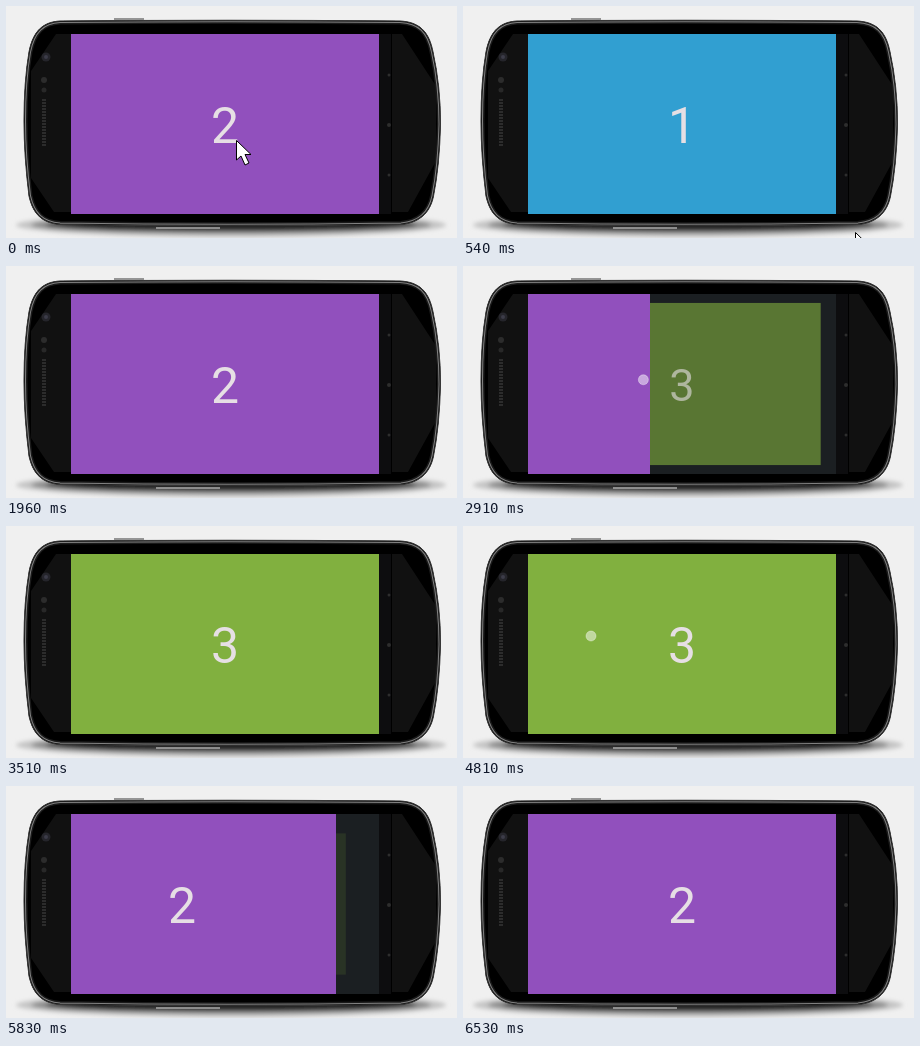
Write an HTML page with a canvas that moves like this. It is 451 by 232 pixels and loops after 7.13 s.

```html
<!DOCTYPE html>
<html lang="en">
<head>
<meta charset="utf-8">
<title>Depth page swipe</title>
<style>
  html, body { margin: 0; width: 100%; height: 100%; overflow: hidden; background: #f0f0f0; }
  svg, canvas { position: absolute; left: 0; top: 0; width: 451px; height: 232px; }
</style>
</head>
<body>
<svg viewBox="0 0 451 232">
  <defs>
    <filter id="soft" x="-10%" y="-50%" width="120%" height="200%"><feGaussianBlur stdDeviation="2"/></filter>
    <path id="body" d="M54 15Q220 13.5 394 15C413 16 423 25 427 46Q434.5 80 434.5 118Q433.5 160 427.5 190C424 208 412 217 395 218.5Q220 221 54 218.5C36 217 27 208 23 190Q18 150 18 115Q18 75 23 46C27 25 37 16 54 15Z"/>
    <clipPath id="inside"><use href="#body"/></clipPath>
  </defs>
  <g filter="url(#soft)">
    <ellipse cx="225" cy="219" rx="215" ry="12" fill="#c4c4c4"/>
    <ellipse cx="225" cy="219" rx="200" ry="9" fill="#888"/>
    <ellipse cx="225" cy="219" rx="185" ry="6" fill="#222"/>
  </g>
  <path d="M108 13h30" stroke="#777" stroke-width="1.5"/>
  <use href="#body" fill="#000" stroke="#2a2a2a"/>
  <g clip-path="url(#inside)">
    <path d="M65 28H50L25 65V172L48 206H65ZM386 28H396L430 80V155L402 206H386Z" fill="#111"/>
    <use href="#body" fill="none" stroke="#1a1a1a" stroke-width="7"/>
    <use href="#body" fill="none" stroke="#808080" stroke-width="4"/>
    <use href="#body" fill="none" stroke="#1c1c1c" stroke-width="2"/>
  </g>
  <path d="M150 222h64" stroke="#aaa" stroke-width="1.5"/>
  <circle cx="40" cy="51" r="4.5" fill="#25252b"/>
  <circle cx="40" cy="51" r="2" fill="#3c3c48"/>
  <circle cx="38" cy="74" r="3" fill="#2c2c2c"/>
  <circle cx="38" cy="84" r="2.5" fill="#282828"/>
  <path d="M38 93v48" stroke="#2c2c2c" stroke-width="4" stroke-dasharray="2 1"/>
  <path d="M373 28h12v180h-12z" fill="#0d0d0f"/>
  <g fill="#2e2e2e"><circle cx="383" cy="69" r="1.5"/><circle cx="383" cy="119" r="2"/><circle cx="383" cy="169" r="1.5"/></g>
</svg>
<canvas id="stage"></canvas>
<script>
const LOOP = 7130, X = 65, Y = 28, W = 308, H = 180;
const COLORS = ['#319fd1', '#9150bd', '#81b03f'];

// The picture advances every 100 ms, counted from each of these moments.
const STARTS = [0, 340, 960, 2710, 4830];

// Page moves: an S-curve around mid. A touch shows a dot from down until up.
const MOVES = [
  { start: 100, mid: 250, end: 540, to: 0 },
  { start: 960, mid: 1410, end: 1960, to: 1, touch: { down: 960, up: 1500, x: 374, y: 137 } },
  { start: 2460, mid: 2860, end: 3510, to: 2, touch: { down: 2460, up: 3060, x: 374, y: 137 } },
  { start: 4830, mid: 5317, end: 6430, to: 1.127, touch: { down: 4810, up: 5600, x: 128, y: 110 } },
  { start: 6430, mid: 6430, end: 6530, to: 1 }
];
const EASE = 120, SLOP = 8;
MOVES.forEach((m, i) => { m.from = i ? MOVES[i - 1].to : 1; });

const ARROW = new Path2D('M.5.5V20L5 16L9 25L13 23L9 14.5H15Z');
const canvas = document.getElementById('stage');
const scale = window.devicePixelRatio || 1;
canvas.width = 451 * scale;
canvas.height = 232 * scale;
const c = canvas.getContext('2d');

function step(t) {
  const start = STARTS.filter(s => s <= t).pop();
  return start + Math.floor((t - start) / 100) * 100;
}

function moveAt(m, t) {
  if (t < m.start) return m.from;
  if (t >= m.end) return m.to;
  return m.from + (m.to - m.from) / (1 + Math.exp((m.mid - t) / EASE));
}

function position(t) {
  const m = MOVES.find(m => t < m.end) || MOVES[MOVES.length - 1];
  return moveAt(m, t);
}

function page(index, shift, size, alpha) {
  c.save();
  c.translate(X + W / 2 - shift, Y + H / 2);
  c.scale(size, size);
  c.globalAlpha = alpha;
  c.fillStyle = COLORS[index];
  c.fillRect(-W / 2, -H / 2, W, H);
  c.fillStyle = '#e6dfe4';
  c.fillText(index + 1, 0, 19);
  c.restore();
}

function drawArrow(t) {
  const u = t < 540 ? Math.max(0, (t - 100) / 440) : (960 - t) / 420;
  const [x, y] = t < 540 ? [230, 134] : [366, 125];
  c.save();
  c.translate(x + (392 - x) * u, y + (226 - y) * u);
  c.fillStyle = '#fff';
  c.strokeStyle = '#000';
  c.fill(ARROW);
  c.stroke(ARROW);
  c.restore();
}

// The finger leads the page by the slop and rises a little as it travels.
function drawTouch(m, t) {
  const moved = (m.from - moveAt(m, t)) * W;
  const dx = moved + SLOP * Math.sign(moved);
  c.fillStyle = 'rgba(255,255,255,.5)';
  c.strokeStyle = 'rgba(255,255,255,.35)';
  c.beginPath();
  c.arc(m.touch.x + dx, m.touch.y - .12 * Math.abs(dx), 5, 0, 2 * Math.PI);
  c.fill();
  c.stroke();
}

function draw(now) {
  const t = step(now % LOOP);
  const pos = position(t);
  const top = Math.floor(pos), part = pos - top;
  c.setTransform(scale, 0, 0, scale, 0, 0);
  c.clearRect(0, 0, 451, 232);
  c.font = '50px Roboto, sans-serif';
  c.textAlign = 'center';
  c.save();
  c.beginPath();
  c.rect(X, Y, W, H);
  c.clip();
  c.fillStyle = '#1b1f22';
  c.fillRect(X, Y, W, H);
  if (part > 0) page(top + 1, 0, .75 + .25 * part, part);
  page(top, Math.round(part * W), 1, 1);
  c.restore();
  if (t < 960) drawArrow(t);
  const held = MOVES.find(m => m.touch && t >= m.touch.down && t < m.touch.up);
  if (held) drawTouch(held, t);
}

const begin = performance.now();
function tick() {
  draw(performance.now() - begin);
  requestAnimationFrame(tick);
}
tick();
</script>
</body>
</html>
```
